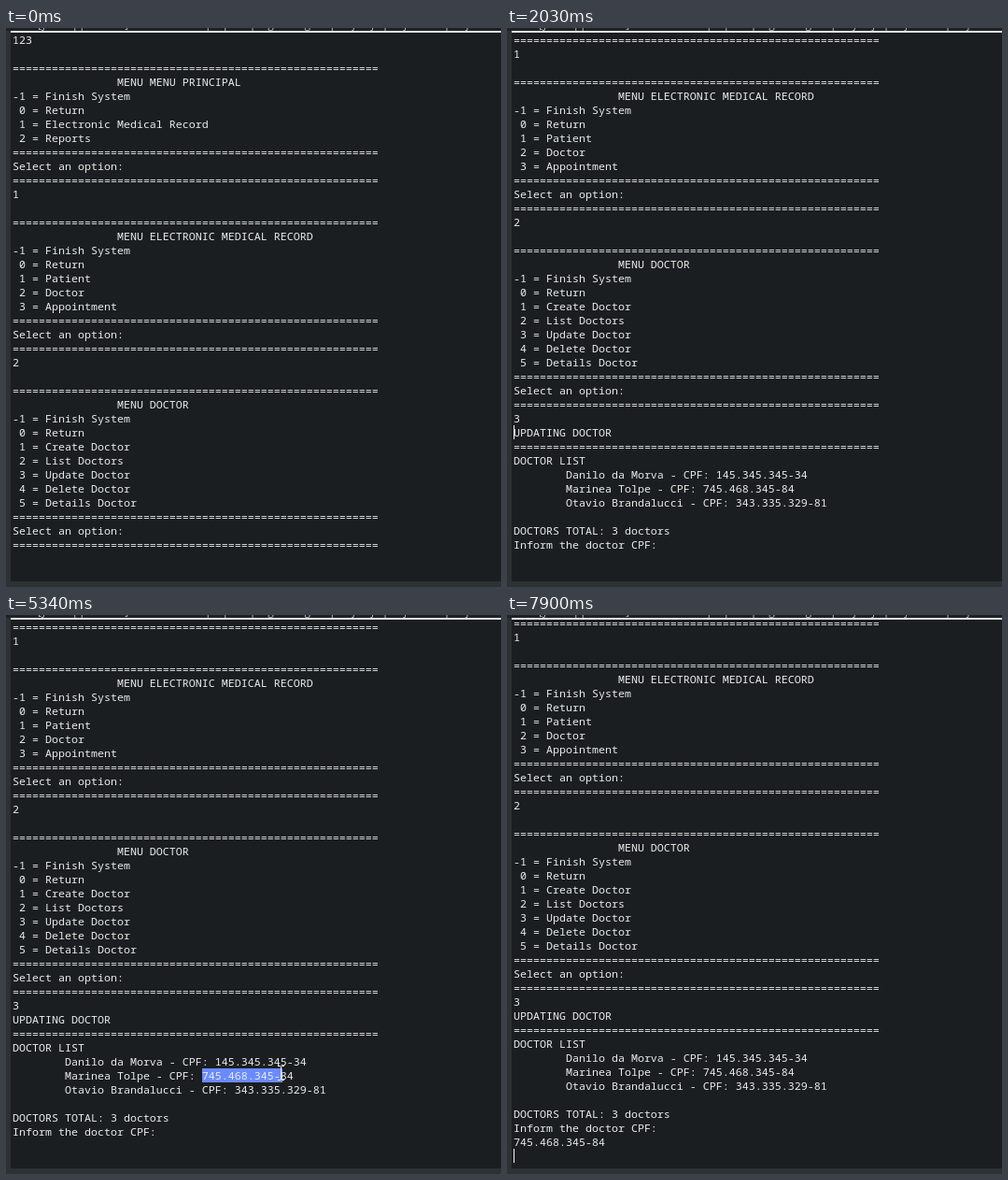
An HTML page that plays this animation: 530x598 px, repeating every 8000 ms.

```html
<!DOCTYPE html>
<html lang="en">
<head>
<meta charset="utf-8">
<title>Console session</title>
<style>
  html, body { margin: 0; width: 100%; height: 100%; overflow: hidden; background: #2d3134; }
  #stage { position: relative; width: 530px; height: 598px; overflow: hidden; background: #2d3134; }
  #header {
    position: absolute; left: 0; top: 0; width: 530px; height: 3px; overflow: hidden;
    background: #1f2326; color: #aeb9c0; white-space: pre;
    font: 12px/16px "Open Sans", sans-serif;
  }
  #header span { position: absolute; left: 34px; top: -12px; }
  #rule { position: absolute; left: 5px; top: 3px; width: 525px; height: 2px; background: #e0e0e0; }
  #console {
    position: absolute; left: 5px; top: 5px; width: 525px; height: 587px;
    overflow: hidden; background: #1b1e20;
  }
  #page { position: absolute; left: 2px; top: 0; }
  #text {
    position: absolute; left: 0; top: 0; margin: 0; color: #ebebeb; white-space: pre;
    font: 11.6667px/15px "Noto Sans Mono", monospace; font-variant-ligatures: none;
  }
  .mark { position: absolute; height: 15px; padding-right: 2px; background: #6a8bff; }
  #caret { position: absolute; width: 1px; height: 15px; background: #f4f4f4; }
  #pointer { position: absolute; left: 0; top: 0; overflow: visible; }
</style>
</head>
<body>
<div id="stage">
  <div id="header"><span>[Java Application] C:\Users\Dev\.p2\pool\plugins\org.eclipse.justj.openjdk.hotspot.jre.full</span></div>
  <div id="rule"></div>
  <div id="console">
    <div id="page">
      <div class="mark"></div>
      <div class="mark"></div>
      <pre id="text"></pre>
      <div id="caret"></div>
    </div>
  </div>
  <svg id="pointer" width="9" height="17" shape-rendering="crispEdges">
    <path d="M-3 -7.5h3M1 -7.5h3M-3 7.5h3M1 7.5h3M.5 -7v14" fill="none" stroke="#f0f0f0"/>
  </svg>
</div>
<script>
const LOOP = 8000, COL = 7, ROW = 15, BLINK = 575, POINTER_STEP = 145;
const bar = "=".repeat(56);
const $ = id => document.getElementById(id);

const menu = (title, ...items) => [
  "", bar, " ".repeat(16) + "MENU " + title, "-1 = Finish System", " 0 = Return",
  ...items.map((item, i) => ` ${i + 1} = ${item}`),
  bar, "Select an option:", bar
];
const doctor = (name, cpf) => `${" ".repeat(8)}${name} - CPF: ${cpf}`;
const cpf = "745.468.345-84";

const lines = [
  "123", ...menu("MENU PRINCIPAL", "Electronic Medical Record", "Reports"),
  "1", ...menu("ELECTRONIC MEDICAL RECORD", "Patient", "Doctor", "Appointment"),
  "2", ...menu("DOCTOR", ...["Create", "List", "Update", "Delete", "Details"].map(
    (verb, i) => verb + (i === 1 ? " Doctors" : " Doctor"))),
  "3", "UPDATING DOCTOR", bar, "DOCTOR LIST",
  doctor("Danilo da Morva", "145.345.345-34"),
  doctor("Marinea Tolpe", cpf),
  doctor("Otavio Brandalucci", "343.335.329-81"),
  "", "DOCTORS TOTAL: 3 doctors", "Inform the doctor CPF:",
  cpf
];

const choiceRow = lines.indexOf("3");
const cpfRow = lines.indexOf(doctor("Marinea Tolpe", cpf));
const cpfCol = lines[cpfRow].indexOf(cpf);
const inputRow = lines.length - 1;
const listRow = lines.indexOf(" 2 = List Doctors");
const endOf = row => [row, lines[row].length];

// A scene changes only what it names; blink is when its caret began to flash.
const scenes = [
  { at: 0, rows: choiceRow, top: 0, caret: endOf(listRow), blink: 150 - 2 * BLINK },
  { at: 1460, rows: choiceRow + 1, caret: endOf(choiceRow), blink: 1460 },
  { at: 1880, top: 4, caret: [choiceRow + 1, 0], blink: 1880 },
  { at: 2030, rows: inputRow, top: 10 * ROW },
  { at: 4640, caret: null },
  { at: 7090, caret: [inputRow, 0], blink: 7090 },
  { at: 7490, rows: inputRow + 1, caret: endOf(inputRow), blink: 7490 },
  { at: 7900, top: 10 * ROW + 4, caret: [inputRow + 1, 0], blink: 7900 }
];

const enter = { start: 3940, end: 4640, path: [[145, 574], [190, 530], [209, 494]] };
const drag = { start: 4920, end: 5940, path: [[209, 494], [290, 492], [323, 478], [314, 486]] };
const leave = { start: 6370, end: 7090, path: [[314, 486], [150, 590], [73, 567]] };

// Walks evenly along the path in whole steps, the first one at the start time.
function along({ start, end, path }, t) {
  const span = end - start;
  const steps = Math.round(span / POINTER_STEP) + 1;
  const done = Math.floor(Math.min(1, (t - start) / span) * (steps - 1)) + 1;
  const place = done / steps * (path.length - 1);
  const i = Math.min(Math.floor(place), path.length - 2);
  return path[i].map((v, axis) => Math.round(v + (path[i + 1][axis] - v) * (place - i)));
}

function pointerAt(t) {
  const move = [enter, drag, leave].findLast(m => m.start <= t);
  return move && t < 7900 ? along(move, t) : null;
}

const marks = document.querySelectorAll(".mark");

function mark(el, row, from, to) {
  el.style.display = to > from ? "block" : "none";
  el.style.left = from * COL + "px";
  el.style.top = row * ROW + "px";
  el.style.width = (to - from) * COL + "px";
}

function select(t, top) {
  marks.forEach(el => mark(el, 0, 0, 0));
  if (t < drag.start || t >= leave.end) return;
  const [x, y] = along(drag, t);
  const row = Math.floor((y - 5 + top) / ROW);
  const col = Math.min(Math.round((x - 7) / COL), lines[row].length);
  if (row === cpfRow) {
    mark(marks[0], row, cpfCol, col);
  } else {
    mark(marks[0], row, col, lines[row].length);
    mark(marks[1], cpfRow, 0, cpfCol);
  }
}

function moveTo(el, position) {
  el.style.display = position ? "block" : "none";
  if (position) el.style.transform = `translate(${position[0]}px, ${position[1]}px)`;
}

let shown = 0;
function draw(t) {
  const { rows, top, caret, blink } = Object.assign({}, ...scenes.filter(s => s.at <= t));
  const lit = caret && Math.floor((t - blink) / BLINK) % 2 === 0;
  if (rows !== shown) $("text").textContent = lines.slice(0, shown = rows).join("\n");
  $("page").style.top = -top + "px";
  moveTo($("caret"), lit && [caret[1] * COL, caret[0] * ROW]);
  moveTo($("pointer"), pointerAt(t));
  select(t, top);
}

const start = performance.now();
function tick() {
  draw((performance.now() - start) % LOOP);
  requestAnimationFrame(tick);
}
tick();
</script>
</body>
</html>
```
